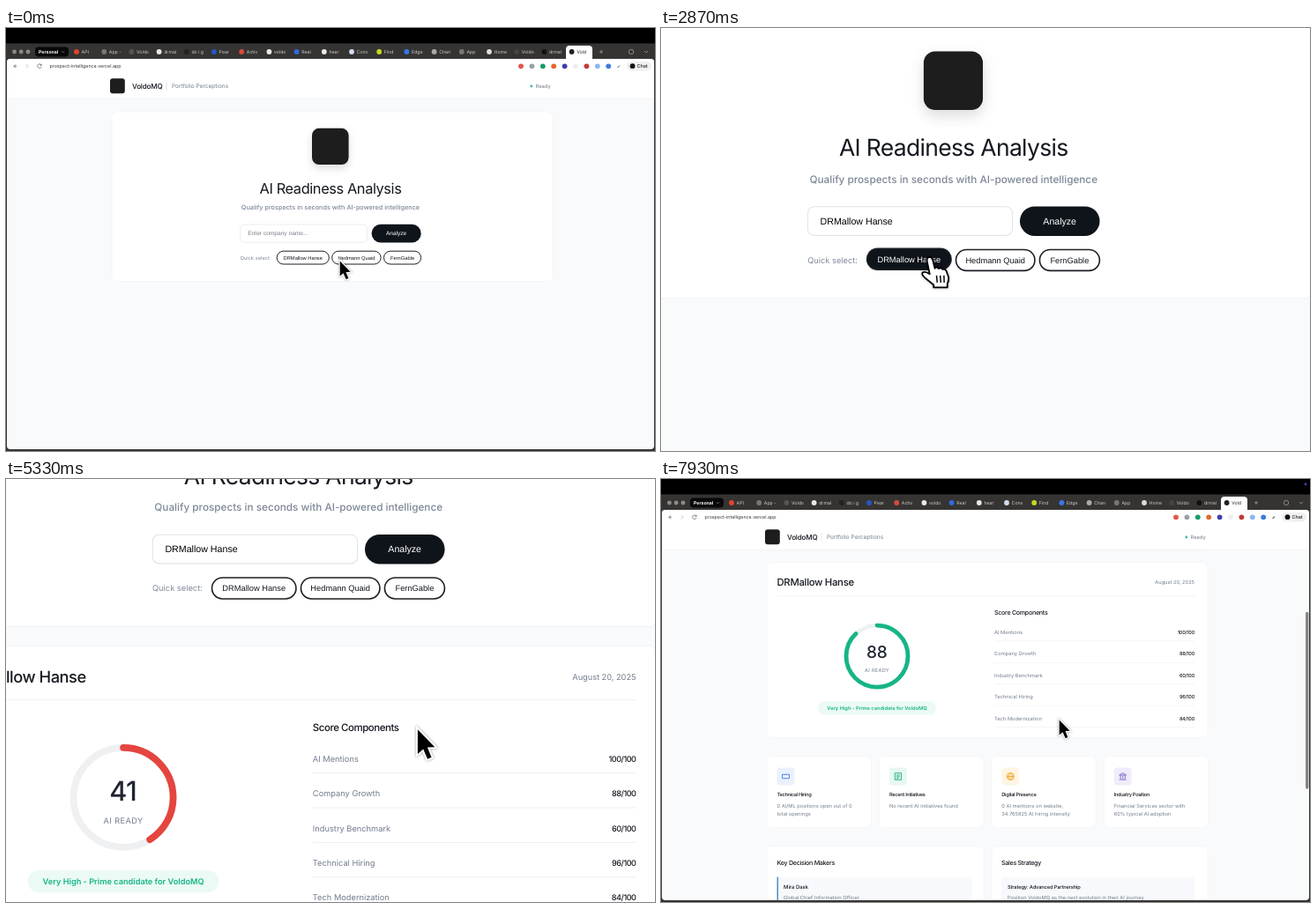
An HTML page for the animation above (8000 ms loop, 736 by 480 pixels).

```html
<!DOCTYPE html>
<html lang="en">
<head>
<meta charset="utf-8">
<title>AI Readiness Analysis</title>
<style>
  html, body { margin: 0; width: 100%; height: 100%; overflow: hidden; background: #000; }
  svg { display: block; width: 736px; height: 480px; }
  text { font-family: Inter, sans-serif; text-rendering: geometricPrecision; white-space: pre; }
  .ui { font-family: "Liberation Sans", Arial, sans-serif; }
  .tile { filter: drop-shadow(0 4px 5px rgba(0, 0, 0, .14)); }
</style>
</head>
<body>
<svg id="stage" viewBox="0 0 736 480"></svg>
<script>
const LOOP = 8000;
const COMPANY = 'DRMallow Hanse', BRAND = 'VoldoMQ';
const INK = '#14181f', GRAY = '#717c8d', LINE = '#eceff3', GREEN = '#16b586';
const $ = id => document.getElementById(id);

// Text is placed by its visual middle rather than its baseline.
const text = (x, y, size, str, fill = INK, extra = '') =>
  `<text x="${x}" y="${y + size * .36}" font-size="${size}" fill="${fill}" ${extra}>${str}</text>`;
const rect = (x, y, w, h, r, fill, extra = '') =>
  `<rect x="${x}" y="${y}" width="${w}" height="${h}" rx="${r}" fill="${fill}" ${extra}/>`;
const circle = (x, y, r, fill, extra = '') =>
  `<circle cx="${x}" cy="${y}" r="${r}" fill="${fill}" ${extra}/>`;
const path = (d, stroke, width = .8, extra = '') =>
  `<path d="${d}" fill="none" stroke="${stroke}" stroke-width="${width}" ${extra}/>`;
const card = (x, y, w, h, fill = '#fff') =>
  rect(x, y, w, h, 6, fill, `stroke="${LINE}" stroke-width=".5"`);
const MIDDLE = 'text-anchor="middle"', END = 'text-anchor="end"', UI = 'class="ui"';
const MEDIUM = 'font-weight="500"';
const SMALL_HEAD = MEDIUM + ' letter-spacing="-.06em"';
const HEAD = MEDIUM + ' letter-spacing="-.04em"';

function chip(x, w, label, id) {
  return `<g id="${id}">` + rect(x, 253.2, w, 14.8, 7.4, '#fff', 'stroke="#1c1f24" stroke-width="1"') +
    text(x + w / 2, 260.6, 5.75, label, INK, `${UI} ${MIDDLE}`) + '</g>';
}

function hero() {
  return card(120, 95, 500, 192.5) +
    rect(347, 113.8, 41.6, 41.2, 8, '#1d1d1e', 'class="tile"') +
    text(368, 181.6, 16.4, 'AI Readiness Analysis', INK, `${MIDDLE} letter-spacing="-.025em"`) +
    text(368, 203.6, 7.28, 'Qualify prospects in seconds with AI-powered intelligence', '#7d8797', `${MIDDLE} ${MEDIUM}`) +
    rect(265.6, 223, 143.8, 20.2, 4.5, '#fff', 'stroke="#e0e4ea" stroke-width=".7"') +
    text(274.3, 233, 6.6, '', INK, `${UI} id="field"`) +
    rect(414.6, 222.8, 56.1, 20.8, 10.4, '#0f141b', 'id="button"') +
    text(442.6, 233, 6.55, 'Analyze', '#fff', `${UI} ${MIDDLE}`) +
    text(265.4, 260.6, 5.75, 'Quick select:', '#808a99') +
    chip(307.2, 59.1, COMPANY, 'firstChip') +
    chip(369.7, 55.4, 'Hedmann Quaid', 'secondChip') +
    chip(428.5, 42.1, 'FernGable', 'thirdChip');
}

function loading() {
  const magnifier = rect(351.5, 366.2, 33.4, 33, 5, '#edf2fa') +
    path('M373.5 387 l5 5', '#26282b', 3.4, 'stroke-linecap="round"') +
    circle(366.2, 379.8, 7.6, '#eef4f8', 'stroke="#55595e" stroke-width="1.7"') +
    path('M361.5 379 q1 -4 5 -4.3', '#fff', 1.3);
  return card(120, 301, 500, 160, '#fcfdfe') +
    `<g id="loadingTitle">${text(368.2, 320.8, 9.85, 'Analyzing ' + COMPANY, INK, `${MIDDLE} font-weight="600" letter-spacing="-.025em"`)}</g>` +
    `<g id="magnifier">${magnifier}</g>`;
}

function scores() {
  const rows = { 'AI Mentions': 100, 'Company Growth': 88, 'Industry Benchmark': 60, 'Technical Hiring': 96, 'Tech Modernization': 84 };
  return Object.entries(rows).map(([label, value], i) => {
    const y = 380.4 + 24.4 * i;
    return text(378, y, 5.74, label, GRAY) +
      text(605, y, 5.6, value + '/100', INK, `${END} ${MEDIUM} letter-spacing="-.05em"`) +
      path(`M378 ${y + 10} H605`, LINE, .6);
  }).join('');
}

function features() {
  const icons = [
    ['#3b7be0', '#eaf1fd', 'M-4 -2.2 h8 v4.4 h-8 z'],
    ['#16a879', '#e6f8f1', 'M-3.6 -3.8 h7.2 v7.6 h-7.2 z M-2 -1.5 h4 M-2 .4 h4 M-2 2.2 h2.4'],
    ['#f0a01e', '#fef5e3', 'M-4 0 a4 4 0 1 0 8 0 a4 4 0 1 0 -8 0 h8 M0 -4 q-4 4 0 8 q4 -4 0 -8'],
    ['#7a5fc8', '#f0ecfb', 'M-4 -1.5 L0 -4 L4 -1.5 z M-2.6 -1 v4 M0 -1 v4 M2.6 -1 v4 M-4 3.6 h8']
  ];
  const copy = [
    ['Technical Hiring', '0 AI/ML positions open out of 0', 'total openings'],
    ['Recent Initiatives', 'No recent AI initiatives found', ''],
    ['Digital Presence', '0 AI mentions on website,', '34.765825 AI hiring intensity'],
    ['Industry Position', 'Financial Services sector with', '60% typical AI adoption']
  ];
  return copy.map(([head, first, second], i) => {
    const [ink, tint, d] = icons[i], x = 131.5 + 127.4 * i;
    return card(x - 11.5, 521, 118.5, 81) + rect(x, 534, 20, 20, 4, tint) +
      `<g transform="translate(${x + 10} 544)">${path(d, ink, .9)}</g>` +
      text(x, 564.5, 5.75, head, INK, SMALL_HEAD) +
      text(x, 577, 5.72, first, GRAY) + text(x, 586, 5.72, second, GRAY);
  }).join('');
}

function results() {
  return card(120, 301, 500, 199) +
    text(131.5, 323, 11.3, COMPANY, INK, MEDIUM + ' letter-spacing="-.025em"') +
    text(605, 323, 5.7, 'August 20, 2025', GRAY, END) +
    path('M131.5 339 H605', LINE, .6) +
    text(378, 358.2, 7.1, 'Score Components', INK, HEAD) + scores() +
    circle(245, 407.6, 35, 'none', 'stroke="#eff0f2" stroke-width="4.8"') +
    circle(245, 407.6, 35, 'none', 'id="arc" pathLength="100" stroke-width="4.8" stroke-linecap="round" transform="rotate(-90 245 407.6)"') +
    text(244.7, 402.8, 19, '', '#1f2632', `${MIDDLE} ${MEDIUM} letter-spacing="-.02em" id="score"`) +
    text(245, 423.6, 5.65, 'AI READY', GRAY, `${MIDDLE} letter-spacing=".05em"`) +
    rect(178, 458.7, 134, 15.6, 7.8, '#ebfaf4') +
    text(245, 466.4, 5.7, `Very High - Prime candidate for ${BRAND}`, GREEN, `${MIDDLE} font-weight="600"`) +
    features() +
    card(120, 623, 246, 140) + card(375, 623, 245, 140) +
    text(131.5, 642, 7.1, 'Key Decision Makers', INK, HEAD) +
    text(386, 642, 7.1, 'Sales Strategy', INK, HEAD) +
    rect(131.5, 658, 221, 60, 2, '#f7f9fc') + rect(131.5, 658, 1.5, 60, 0, '#4a8fd0') +
    text(139, 669.3, 5.9, 'Mira Dask', INK, MEDIUM) +
    text(139, 681, 5.72, 'Global Chief Information Officer', GRAY) +
    rect(386, 658, 219, 60, 2, '#f7f9fc') +
    text(393, 669, 5.75, 'Strategy: Advanced Partnership', INK, MEDIUM + ' letter-spacing="-.03em"') +
    text(393, 681, 5.72, `Position ${BRAND} as the next evolution in their AI journey`, GRAY);
}

function tabStrip() {
  const labels = 'API,App -,Voldo,drmal,do i g,Pear,Activ,voldo,Real,hear,Conv,Find,Edge,Chan,App,Home,Voldo,drmal,Vold'.split(',');
  const colors = ['#e0442e', '#777', '#555', '#e8e8e8', '#222', '#2458c8', '#d84a3c', '#e8e8e8', '#2d6be0', '#e8e8e8',
    '#d5dcf0', '#c8d822', '#3478e8', '#aaa', '#777', '#ddd', '#444', '#111', '#222'];
  const tabs = labels.map((label, i) => {
    const x = 80 + 31.2 * i, active = i === labels.length - 1;
    return (active ? rect(635, 20, 30, 18, 4, '#fff') : '') + circle(x, 27, 2.9, colors[i]) +
      text(x + 5.6, 27, 5.2, label, active ? '#222' : '#cfcdca');
  }).join('');
  return rect(0, 0, 736, 17.5, 0, '#000') + circle(731, 6, 1.4, '#5a36b8', 'id="indicator"') +
    [9.5, 17.2, 25].map(x => circle(x, 27, 2.4, '#8d8a87')).join('') +
    rect(33, 21.5, 38, 11, 4, '#080808') + text(37, 27, 5.2, 'Personal', '#fff', 'font-weight="700"') +
    path('M63 26.3 l1.5 1.5 l1.5 -1.5', '#999', .7) + tabs +
    path('M673 27 h4 M675 25 v4', '#aaa', .7) + path('M724 26 l2 2 l2 -2', '#aaa', .7) +
    circle(709, 27, 2.7, 'none', 'stroke="#aaa" stroke-width=".7"');
}

function toolbar() {
  const colors = ['#e2574c', '#9aa0a6', '#169b6b', '#e06a2b', '#3d3fae', '#eceef0', '#c33a37', '#8fb4ee', '#3f7be0'];
  return rect(1, 35, 734, 45, 0, '#fff') + path('M1 80 H735', '#eef0f3', .7) +
    path('M11 41.3 l-2 2 l2 2 M8.8 43.3 h3.4', '#555', .7) + path('M23 41.3 l2 2 l-2 2', '#aaa', .7) +
    path('M40 42 a2.3 2.3 0 1 0 .2 2 M40.2 40.8 v1.6 h-1.6', '#555', .7) +
    text(49.5, 43.3, 5.3, 'prospect-intelligence.vercel.app', '#333') +
    colors.map((color, i) => circle(584 + 12.4 * i, 43.3, 2.9, color)).join('') +
    path('M693.5 45 l2.4 -2.4', '#444', 1) +
    rect(704, 38, 28, 10.4, 5.2, '#f0f0f1') + circle(710.5, 43.2, 2.9, '#111') +
    text(715.5, 43.2, 5.4, 'Chat', '#222', MEDIUM) +
    rect(118, 57.2, 16.8, 17, 3, '#1d1d1e') +
    text(143, 65.8, 8.1, BRAND, INK, MEDIUM + ' letter-spacing="-.02em"') +
    path('M182 61.5 V70', '#cfd4db', .7) +
    text(188, 65.8, 6.5, 'Portfolio Perceptions', GRAY) +
    circle(595.8, 66, 1.4, '#35c193') + text(600.5, 66, 5.8, 'Ready', GRAY);
}

function cursors() {
  const arrow = 'M.7 1.5 V18.6 L4.6 15.2 L7.6 22.2 L10.4 21 L7.5 14.1 L12.7 13.8 Z';
  const hand = 'M-2.2 2.2 Q-2 .2 -.3 0 Q1.3 0 1.9 2 L3.4 8 Q4.8 6.6 6.1 8.2 Q7.6 7 8.9 8.8 Q10.8 8 11.6 10.2 L13 14 Q13.4 17 12.2 18.6 V21.4 H2.6 V19.6 L-3.6 14.6 Q-6.4 12 -5 10.8 Q-3.4 9.8 -.2 12 Z';
  return `<g id="cursor" style="filter:drop-shadow(0 .8px .9px rgba(0,0,0,.4))">
    <path id="arrow" d="${arrow}" fill="#000" stroke="#fff" stroke-width="2.4" paint-order="stroke"/>
    <g id="hand" stroke-linejoin="round"><path d="${hand}" fill="#fff" stroke="#000" stroke-width="1.1"/>
    ${path('M4.6 13 l.5 5 M7.2 13 l.4 5 M9.8 13 l.2 5', '#000', .9)}</g></g>`;
}

$('stage').innerHTML = `
  <clipPath id="window">${rect(1, 35, 734, 443, 4, '#fff')}</clipPath>
  <g id="camera">
    ${rect(0, 0, 736, 480, 0, '#363432')}${tabStrip()}
    <g clip-path="url(#window)">
      ${rect(0, 35, 736, 445, 0, '#f9fafc')}
      <g id="page">${hero()}<g id="loading">${loading()}</g><g id="results">${results()}</g></g>
      ${toolbar()}
      ${rect(731, 0, 3.4, 201, 1.7, '#858585', 'id="scrollbar"')}
    </g>
    ${cursors()}
  </g>`;

const clamp = x => Math.min(1, Math.max(0, x));
const ramp = (t, from, to) => clamp((t - from) / (to - from));
const smooth = (t, from, to) => { const p = ramp(t, from, to); return p * p * (3 - 2 * p); };
const spring = (t, start, rate) => {
  const x = Math.max(0, t - start) * rate / 1000;
  return 1 - (1 + x) * Math.exp(-x);
};
const set = (id, attrs) => { for (const key in attrs) $(id).setAttribute(key, attrs[key]); };

const FOCUS = [427, 256];
const moves = [[1200, 1850, 346.2, 260.2], [2800, 3300, 441.9, 227], [3850, 4300, 451, 272]];

function cursorAt(t) {
  let x = 378, y = 263;
  for (const [from, to, nextX, nextY] of moves) {
    const p = smooth(t, from, to);
    x += (nextX - x) * p;
    y += (nextY - y) * p;
  }
  return [x, y];
}

function render(t) {
  const zoom = 1 + .615 * (spring(t, 1740, 7.8) - spring(t, 5720, 8));
  const scroll = 92 * spring(t, 4230, 4.08) + 121 * spring(t, 7000, 5);
  set('camera', { transform: `translate(${FOCUS[0] * (1 - zoom)} ${FOCUS[1] * (1 - zoom)}) scale(${zoom})` });
  set('page', { transform: `translate(0 ${-scroll})` });
  set('scrollbar', { y: 51 + scroll * .483, opacity: ramp(t, 7000, 7100) });
  set('indicator', { opacity: t < 70 ? 0 : 1 });

  const [x, y] = cursorAt(t);
  const overChip = t > 1200 && x < 366.3 && y > 253;
  const overButton = x > 414.6 && y < 243.6;
  set('cursor', { transform: `translate(${x} ${y})` });
  set('arrow', { opacity: overChip || overButton ? 0 : 1 });
  set('hand', { opacity: overChip || overButton ? 1 : 0 });

  const hover = smooth(t, 1500, 1700) * (1 - smooth(t, 2900, 3080));
  const mix = (from, to) => `rgb(${from.map((c, i) => Math.round(c + (to[i] - c) * hover))})`;
  set('firstChip', { transform: `translate(0 ${-.7 * hover})` });
  $('firstChip').firstChild.setAttribute('fill', mix([255, 255, 255], [15, 20, 27]));
  $('firstChip').lastChild.setAttribute('fill', mix([20, 24, 31], [255, 255, 255]));

  const filled = t >= 2650;
  $('field').textContent = filled ? COMPANY : 'Enter company name...';
  set('field', { fill: filled ? '#000' : '#777d86' });

  const busy = t >= 3420 && t < 4720;
  const appear = smooth(t, 3420, 3850);
  set('button', { fill: busy ? '#a0adbf' : '#0f141b' });
  set('loading', { opacity: busy ? 1 : 0 });
  set('loadingTitle', { opacity: appear, transform: `translate(0 ${6 * (1 - appear)})` });
  set('magnifier', { opacity: ramp(t, 3420, 3620) * (1 - ramp(t, 4220, 4400)) });

  const score = Math.min(88, Math.max(0, (t - 4870) * .0891));
  set('results', { opacity: ramp(t, 4720, 4900) });
  $('score').textContent = Math.round(score);
  set('arc', {
    'stroke-dasharray': `${score} 100`,
    stroke: score < 50 ? '#e5453f' : score < 70 ? '#f0a01e' : GREEN
  });
}

function loop() {
  render(performance.now() % LOOP);
  requestAnimationFrame(loop);
}
loop();
</script>
</body>
</html>
```
